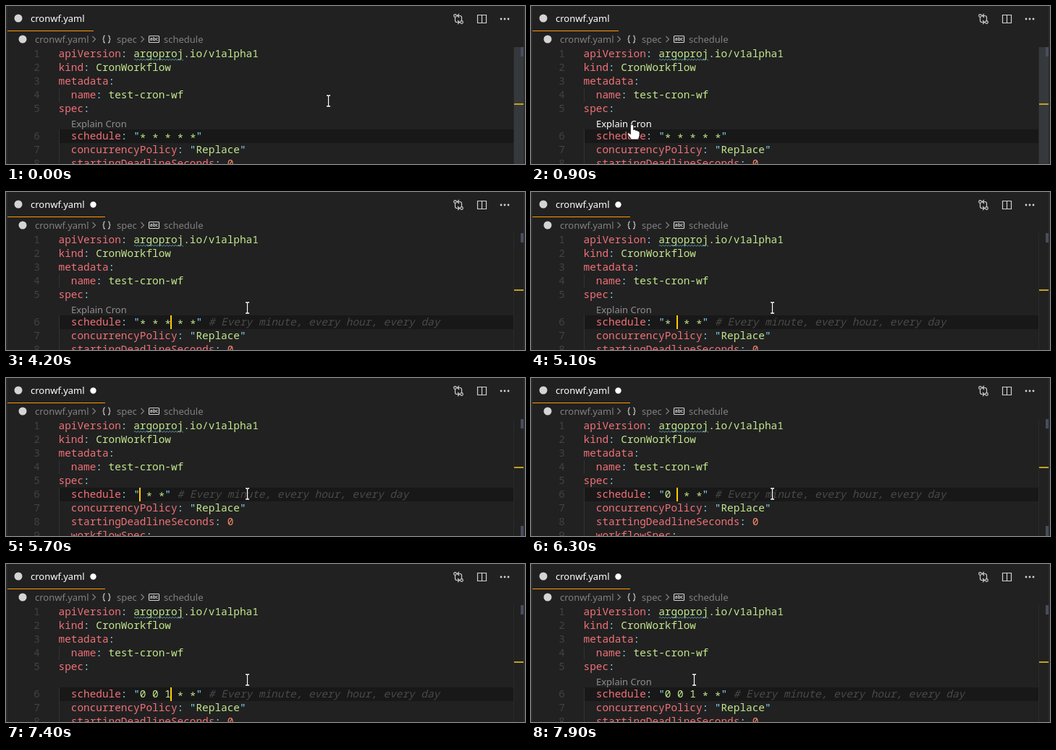
Write an HTML page that moves like this. It is 717 px wide and 219 px high and loops after 8 s.

```html
<!DOCTYPE html>
<html lang="en">
<head>
<meta charset="utf-8">
<title>Cron editor</title>
<style>
  html, body { margin: 0; width: 100%; height: 100%; overflow: hidden; background: #212121; }
  svg { display: block; }
  text { white-space: pre; }
  .code { font: 14.4px "Noto Sans Mono", "DejaVu Sans Mono", monospace; }
  .ui { font: 13px "Noto Sans", "Open Sans", sans-serif; }
  .key { fill: #f07178; }
  .str { fill: #c3e88d; }
  .pun { fill: #89ddff; }
  .num { fill: #f78c6c; }
  .note { fill: #4a4a4a; font-style: italic; }
  .gutter { fill: #424242; text-anchor: end; }
  .icon { fill: none; stroke: #d0d0d0; stroke-width: 1.2; }
  .crumb { fill: #808080; }
</style>
</head>
<body>
<svg id="stage" width="717" height="219" viewBox="0 0 717 219">
  <rect width="717" height="219" fill="#212121"/>
  <rect width="2" height="219" fill="#2b2b2b"/>
  <rect x="715" width="2" height="219" fill="#2b2b2b"/>

  <circle cx="17" cy="17" r="5.5" fill="#d4d4d4"/>
  <text class="ui" x="34" y="22" fill="#fff">cronwf.yaml</text>
  <circle id="dirty" cx="120.5" cy="17.5" r="4.2" fill="#fff"/>
  <rect id="tabLine" x="2" y="34" height="1" fill="#ff9800"/>

  <g class="icon">
    <circle cx="620.5" cy="13.5" r="1.8"/>
    <circle cx="629.5" cy="22.5" r="1.8"/>
    <path d="M620.5 15.5V20q0 2.5 2.5 2.5h3M624 20l2.500 2.500l-2.500 2.500M629.500 20.500V16q0-2.500-2.500-2.500h-3M626 11l-2.500 2.500l2.500 2.500"/>
    <path d="M651.500 12.500h12v11h-12zM657.500 12.500v11"/>
  </g>
  <g fill="#d0d0d0">
    <circle cx="684" cy="18" r="1.4"/><circle cx="689" cy="18" r="1.4"/><circle cx="694" cy="18" r="1.4"/>
  </g>

  <circle cx="23" cy="46" r="5.500" fill="#d4d4d4"/>
  <g class="ui crumb">
    <text x="40" y="51">cronwf.yaml</text>
    <text x="153" y="51">spec</text>
    <text x="218" y="51">schedule</text>
    <path d="M119.500 42l4 4-4 4M186.500 42l4 4-4 4" fill="none" stroke="#808080" stroke-width="1.200"/>
  </g>
  <g class="icon">
    <path d="M137 41q-2 0-2 2v1.500q0 1.500-1.500 1.500q1.500 0 1.500 1.500V49q0 2 2 2M141 41q2 0 2 2v1.500q0 1.500 1.500 1.500q-1.500 0-1.500 1.500V49q0 2-2 2"/>
    <rect x="197.500" y="41.500" width="14" height="9" rx="1"/>
  </g>
  <text x="204.500" y="48.300" text-anchor="middle" fill="#d0d0d0" style="font:bold 6.500px 'Noto Sans',sans-serif">abc</text>

  <g id="upper"></g>
  <path id="squiggle" fill="none" stroke="#4d8796" stroke-width="1"/>
  <text id="lens" class="ui" x="90" y="168">Explain Cron</text>

  <g id="lower">
    <rect x="73" y="152" width="628" height="19" fill="#181818"/>
    <g id="lowerRows"></g>
    <rect id="caret" y="152" width="2" height="19" fill="#ffcc00"/>
  </g>

  <path d="M701.500 57V219" stroke="#2a2a2a"/>
  <rect id="slider" x="702" y="57" width="13" height="162" fill="#35393c"/>
  <rect x="711" y="57" width="4" height="13" fill="#474c60"/>
  <rect id="mark" x="711" y="205" width="4" height="14" fill="#474c60"/>
  <rect id="ruler" x="702" width="13" height="2" fill="#c4a020"/>

  <g id="beam" fill="none">
    <path d="M-2.500-7.500H-1Q0-7.500 0-6.500Q0-7.500 1-7.500H2.500M0-6.500V6.500M-2.500 7.500H-1Q0 7.500 0 6.500Q0 7.500 1 7.500H2.500" stroke="#111" stroke-width="3"/>
    <path d="M-2.500-7.500H-1Q0-7.500 0-6.500Q0-7.500 1-7.500H2.500M0-6.500V6.500M-2.500 7.500H-1Q0 7.500 0 6.500Q0 7.500 1 7.500H2.500" stroke="#fff" stroke-width="1.300"/>
  </g>
  <path id="hand" d="M-2 0Q0-2.500 2 0V6Q4 5 5 7Q7 6 8 8Q10.500 7.500 10.500 10V14Q10 17 8.500 19.500H-1Q-3 16-6 12.500Q-7 9.500-4 10.500L-2 12.500Z" fill="#fff" stroke="#222" stroke-width=".8"/>
</svg>
<script>
const LOOP = 8000, LEFT = 72.5, CHAR = 8.64, ROW = 19;
const $ = id => document.getElementById(id);
const baseline = row => 52 + ROW * row;
const span = (kind, text, dy = 0) => `<tspan class="${kind}" dy="${dy}">${text}</tspan>`;
const pair = (key, value = "") => span("key", key) + span("pun", ":") + value;
const str = text => span("str", " " + text);
const quote = span("pun", '"');

function rowMarkup(row, indent, content, id = "") {
  const y = baseline(row);
  const guide = indent ? `<path d="M73.5 ${y - 14}v${ROW}" stroke="#333"/>` : "";
  return `${guide}<text class="code gutter" x="47" y="${y}">${row}</text>
    <text class="code" id="${id}" x="${LEFT + indent * CHAR}" y="${y}">${content}</text>`;
}

$("upper").innerHTML = [
  rowMarkup(1, 0, pair("apiVersion", str("argoproj.io/v1alpha1"))),
  rowMarkup(2, 0, pair("kind", str("CronWorkflow"))),
  rowMarkup(3, 0, pair("metadata")),
  rowMarkup(4, 2, pair("name", str("test-cron-wf"))),
  rowMarkup(5, 0, pair("spec"))
].join("");
$("lowerRows").innerHTML = [
  rowMarkup(6, 2, "", "schedule"),
  rowMarkup(7, 2, pair("concurrencyPolicy", " " + quote + span("str", "Replace") + quote)),
  rowMarkup(8, 2, pair("startingDeadlineSeconds", span("num", " 0"))),
  rowMarkup(9, 2, pair("workflowSpec"))
].join("");

let wave = "M177 75";
for (let x = 177; x < 245; x += 4) wave += "q1-3 2-1t2 1";
$("squiggle").setAttribute("d", wave);

// Text left of the caret after each edit.
const edits = [
  [0, "* * *"], [4900, "* * "], [5000, "* *"], [5100, "* "], [5300, "*"], [5500, ""],
  [6100, "0"], [6300, "0 "], [6500, "0 0"], [6700, "0 0 "], [7100, "0 0 1"]
];
const blinks = [[0, 0], [4000, 1], [4700, 0], [4900, 1], [6000, 0], [6100, 1], [7600, 0]];
const latest = (list, t) => list.filter(([start]) => start <= t).pop()[1];

// Stars sit lower than the font places them.
const cronSpans = cron => cron.split(/(\*)/).filter(Boolean)
  .map(part => part === "*" ? span("str", "*", 3) + span("str", "\u200b", -3) : span("str", part)).join("");

const mix = (a, b, p) => a + (b - a) * p;
const along = (from, to, p) => [mix(from[0], to[0], p), mix(from[1], to[1], p)];

function pointer(t) {
  const rest = [445, 131], link = [139, 165], click = [228, 180], idle = [333, 160];
  const step = start => Math.floor((t - start) / 100) + 1;
  if (t < 200) return rest;
  if (t < 900) {
    const p = step(200) / 8;
    return along(rest, link, p * p * (3 - 2 * p));
  }
  if (t < 3700) return link;
  if (t < 4000) return along(link, click, step(3700) / 3);
  if (t < 4200) return along(click, idle, step(4000) / 3);
  return t < 7900 ? idle : [225, 160];
}

const show = (id, on) => $(id).setAttribute("visibility", on ? "visible" : "hidden");
const set = (id, name, value) => $(id).setAttribute(name, value);
let shownLine = "";

function draw(t) {
  const edited = t >= 3200, folded = t >= 5700 && t < 7400;
  show("dirty", edited);
  set("tabLine", "width", edited ? 135 : 119);
  show("slider", t < 3100);
  show("mark", folded);
  set("ruler", "y", folded ? 123 : 135);
  set("lower", "transform", `translate(0 ${folded ? 0 : ROW})`);

  const left = latest(edits, t);
  const line = pair("schedule", " " + quote + cronSpans(left + " * *") + quote)
    + (edited ? span("note", " # Every minute, every hour, every day") : "");
  if (line !== shownLine) $("schedule").innerHTML = shownLine = line;
  set("caret", "x", Math.round(LEFT + CHAR * (13 + left.length) - 1));
  show("caret", latest(blinks, t));

  const [x, y] = pointer(t);
  const hover = x >= 90 && x <= 168 && y >= 152 && y <= 171;
  show("lens", t < 5700 || t >= 7600);
  set("lens", "fill", hover ? "#fff" : "#8f8f8f");
  set("lens", "opacity", t >= 7600 && t < 7700 ? 0.5 : 1);
  show("beam", !hover);
  show("hand", hover);
  set(hover ? "hand" : "beam", "transform", `translate(${Math.round(x) + 0.5} ${Math.round(y) + 0.5})`);
}

const begin = performance.now();
function tick() {
  draw((performance.now() - begin) % LOOP);
  requestAnimationFrame(tick);
}
tick();
</script>
</body>
</html>
```
